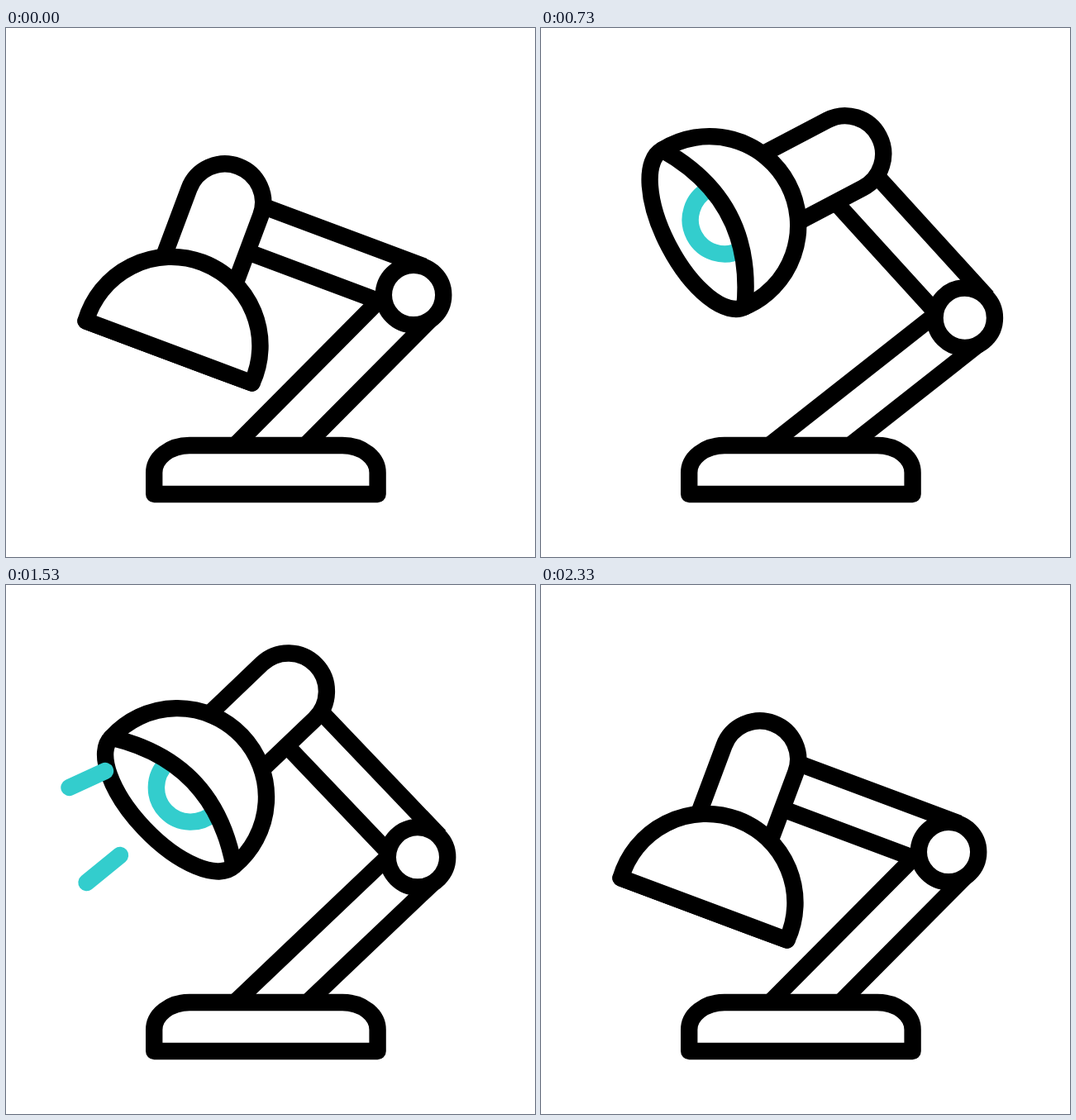
An HTML page that plays this animation: 640x640 px, repeating every 2.5 s.

```html
<!DOCTYPE html>
<html lang="en">
<head>
<meta charset="utf-8">
<title>Desk lamp</title>
<style>
  html, body { margin: 0; width: 100%; height: 100%; overflow: hidden; background: #fff; }
  svg { display: block; width: 100%; height: 100%; }
  .ink { fill: #fff; stroke: #000; stroke-width: 20.4; stroke-linejoin: round; }
  .line { fill: none; }
  .glow { fill: none; stroke: #33cdcd; stroke-width: 20.4; stroke-linecap: round; }
</style>
</head>
<body>
<svg viewBox="0 0 640 640">
  <clipPath id="aboveBase"><rect width="640" height="495"/></clipPath>
  <g clip-path="url(#aboveBase)">
    <path id="lower" class="ink line" d="M-340 -25H0M-340 35.4H0"/>
  </g>
  <g id="upper">
    <path class="ink line" d="M-210 -36.9H0M-210 21.5H0"/>
    <g id="head">
      <path class="ink" d="M-46.3 110V0A46.3 46.3 0 0 1 46.3 0V110"/>
      <circle id="bulb" class="glow" cx="2.6" r="41.4"/>
      <path id="rim" class="ink line" stroke-linecap="round"/>
      <path id="dome" class="ink"/>
    </g>
  </g>
  <circle id="elbow" class="ink" r="36.2"/>
  <path class="ink" d="M179.2 564V538C179.2 520 198 505 222 505H407C431 505 449.6 520 449.6 538V564Z"/>
  <g id="rays"></g>
</svg>
<script>
const LOOP = 2500, FRAME = 1000 / 30;
const PIVOT = { x: 277, y: 498, reach: 278, rest: 39 };
const RIM = { half: 107.3, y: 193.5 };
const $ = id => document.getElementById(id);

// Start point, end point, and the frames when each ray grows and retracts
const rays = [
  { from: [234, 334], to: [224, 383], grow: [32.4, 35.4], fade: [39, 43] },
  { from: [138, 327], to: [97.5, 360], grow: [36, 40], fade: [46, 49] },
  { from: [120, 225], to: [76.5, 245], grow: [40, 44], fade: [47, 50] }
];
for (const ray of rays) {
  ray.el = document.createElementNS("http://www.w3.org/2000/svg", "path");
  ray.el.setAttribute("class", "glow");
  $("rays").append(ray.el);
}

const ramp = (f, a, b) => Math.min(1, Math.max(0, (f - a) / (b - a)));
const ease = (f, a, b) => { const u = ramp(f, a, b); return u * u * (3 - 2 * u); };
const mix = (a, b, k) => a + (b - a) * k;
const set = (id, name, value) => $(id).setAttribute(name, value);

// Gentle lead-in before the main lift
const lift = (f, a, b) => Math.max(ease(f, a, b), 0.055 * Math.min(1, f / 14) ** 4);

function pose(f) {
  return {
    swing: 8.6 * lift(f, 12, 25.8) - 6.95 * ease(f, 25.8, 36.3)
         + 6.95 * ease(f, 51, 64) - 8.6 * ease(f, 62.7, 70),
    bend: 20.5 + 24.2 * (lift(f, 12, 25.5) - ease(f, 54, 69.8)),
    nod: 15.3 * (ease(f, 11.5, 23.5) - ease(f, 23.5, 34)),
    open: ease(f, 14, 21) - ease(f, 63, 70)
  };
}

function draw(f) {
  const { swing, bend, nod, open } = pose(f);
  const angle = (PIVOT.rest - swing) * Math.PI / 180;
  const x = PIVOT.x + PIVOT.reach * Math.cos(angle);
  const y = PIVOT.y - PIVOT.reach * Math.sin(angle);
  const at = `translate(${x} ${y})`;
  set("elbow", "transform", at);
  set("lower", "transform", `${at} rotate(${swing - 45.2})`);
  set("upper", "transform", `${at} rotate(${bend + swing})`);
  set("head", "transform", `translate(-244.6 9.4) rotate(${nod}) translate(-8.5 -34.7)`);

  const { half, y: ry } = RIM;
  set("bulb", "cy", mix(142, 166, open));
  set("rim", "d", `M${-half} ${ry}A${half} ${47 * open} 0 0 0 ${half} ${ry}`);
  set("dome", "d", `M${-half} ${ry}A107.6 107.6 0 1 1 ${half} ${ry}Q0 ${ry - 70 * open} ${-half} ${ry}Z`);

  for (const { el, from, to, grow, fade } of rays) {
    const head = ramp(f, ...grow), tail = ramp(f, ...fade);
    const point = k => `${mix(from[0], to[0], k)} ${mix(from[1], to[1], k)}`;
    el.setAttribute("d", head > tail ? `M${point(tail)}L${point(head)}` : "");
  }
}

const start = performance.now();
function tick() {
  const t = (performance.now() - start) % LOOP;
  draw(Math.floor((t + 5) / FRAME) % 75);
  requestAnimationFrame(tick);
}
tick();
</script>
</body>
</html>
```
